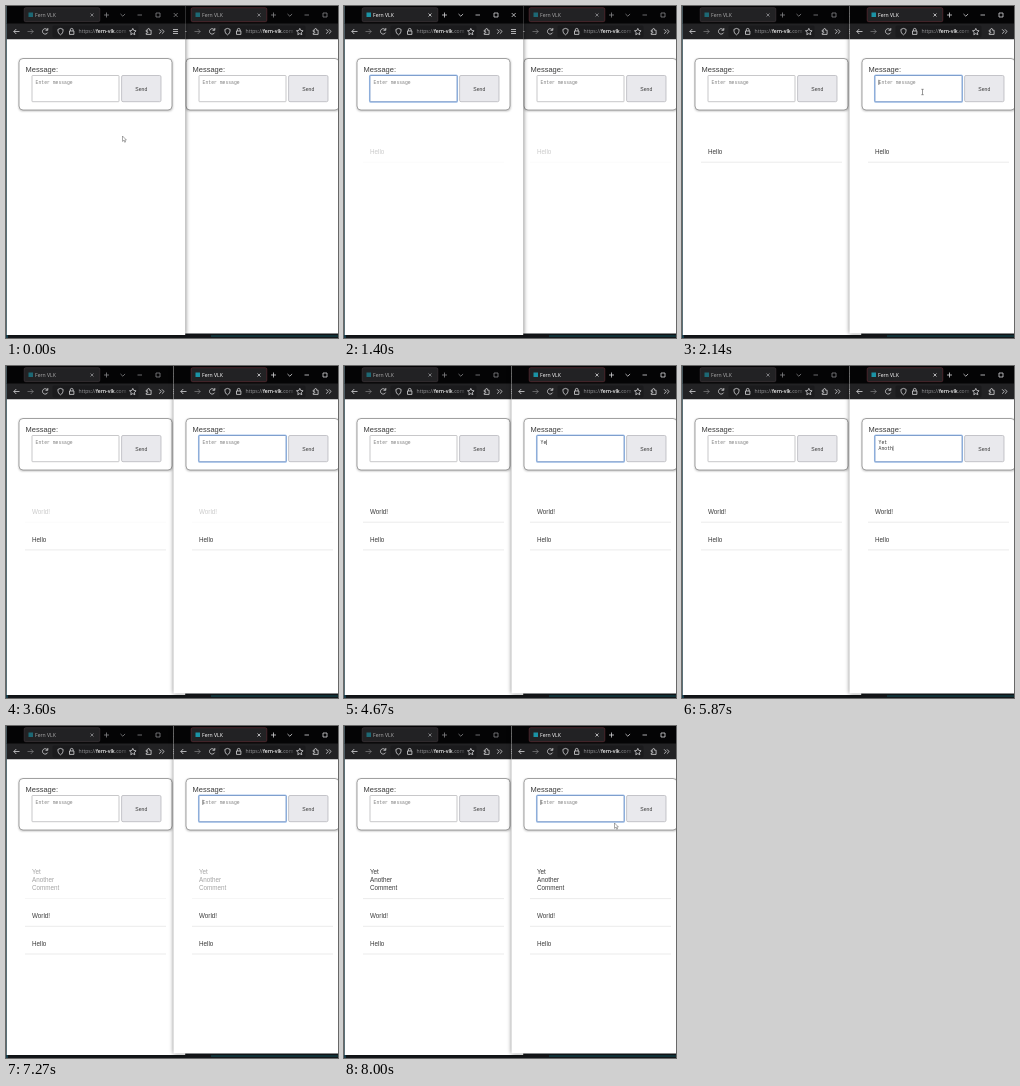
These frames come from a looping animation (332 by 332 pixels, 8070 ms). An HTML page:

```html
<!DOCTYPE html>
<html lang="en">
<head>
<meta charset="utf-8">
<title>Live messages</title>
<style>
html, body { margin: 0; height: 100%; overflow: hidden; background: #15181b; }
svg { display: block; width: 332px; height: 332px; }
text { white-space: pre; }
.ui { font-family: "Open Sans", sans-serif; font-size: 5.1px; }
.page { font-family: "Liberation Sans", Arial, sans-serif; fill: #3c3c3c; }
.mono { font-family: "Liberation Mono", monospace; font-size: 4.75px; }
.icon { fill: none; stroke: #d6d6d8; stroke-width: .8; stroke-linejoin: round; }
</style>
</head>
<body>
<svg viewBox="0 0 332 332">
  <defs>
    <linearGradient id="fade">
      <stop offset="0" stop-color="#1b1b1d" stop-opacity="0"/>
      <stop offset=".65" stop-color="#1b1b1d"/>
    </linearGradient>
  </defs>
  <rect width="332" height="332" fill="#15181b"/>
  <rect width="2" height="332" fill="#1d4452"/>
  <path d="M205 330H332" stroke="#12363c" stroke-width="2"/>
  <g id="scene"></g>
</svg>
<script>
const LOOP = 8070, SHIFT = 167, CHAR = 2.85, LINE = 6;
const FOCUS = 200, SWITCH = 1940;

// Text typed one character per listed time, then cleared; posted at `post`
const messages = [
  { side: 0, text: 'Hello', keys: [470, 600, 740, 800, 1000], clear: 1140, post: 1270 },
  { side: 1, text: 'World!', keys: [2600, 2670, 2740, 2800, 2940, 3200], clear: 3400, post: 3470 },
  { side: 1, text: 'Yet\nAnother\nComment',
    keys: [4470, 4600, 4800, 5200, 5470, 5600, 5740, 5800, 5870, 5940, 6000, 6270,
           6470, 6540, 6600, 6670, 6740, 6800, 6870], clear: 7060, post: 7040 },
];
const carets = [[270, 1140], [1940, 2400], [2600, 3400], [3940, 4270], [4470, 7530], [7800, LOOP]];
// Pointer paths: [time, x, y] points; hidden between paths
const paths = [
  [[0, 116.5, 130], [69, 116.5, 130], [270, 95, 86], [470, 95, 86]],
  [[1600, 95, 86], [2000, 240.5, 86], [2600, 240.5, 86]],
  [[7740, 240.5, 86], [8000, 270.5, 97], [LOOP, 270.5, 97]],
];

const within = ([a, b], t) => t >= a && t < b;
const icon = (d, extra = '') => `<path class="icon" d="${d}" ${extra}/>`;
const label = (x, y, s, attrs) => `<text x="${x}" y="${y}" ${attrs}>${s}</text>`;

function chrome(side, active) {
  const dim = active ? 1 : .62;
  return `<rect width="179" height="18" fill="#040405"/>
    <rect y="17.5" width="179" height="16" fill="#222224"/>
    <rect x="46" y="19.5" width="86" height="12" rx="1.5" fill="#1b1b1d"/>
    <rect x="17.7" y="1.7" width="75.6" height="14" rx="1.5" fill="#222224"
      stroke="${side ? '#6a3038' : '#453c40'}" stroke-width=".6"/>
    <g opacity="${dim}">
      <rect x="22" y="6.5" width="4.5" height="4.5" fill="#1b93a5"/>
      ${label(28.5, 10.8, 'Fern VLK', 'class="ui" fill="#fff"')}
      ${icon('M84 7.5l3 3m0-3l-3 3M97.5 9h5M100 6.5v5M114 8l2.3 2.2L118.6 8')}
      ${icon('M131 9h4.5M149.5 7h4v4h-4zM167.2 7l4 4m0-4l-4 4')}
    </g>
    ${icon('M13 25.5H7.3M9.8 23L7.3 25.5L9.8 28')}
    ${icon('M21 25.5h5.7M24.2 23l2.5 2.5L24.2 28', 'opacity=".45"')}
    ${icon('M41 24a2.7 2.7 0 1 0 .1 2.6M41.3 22v2.3H39')}
    ${icon('M54 22.4l2.6 1c0 3-.8 4.4-2.6 5.4c-1.8-1-2.6-2.4-2.6-5.4z')}
    ${icon('M63 25h4.4v3.4H63zM63.8 25v-1.2a1.4 1.4 0 0 1 2.8 0V25')}
    <text x="72" y="27.3" class="ui" fill="#9a9a9e">https://<tspan fill="#f4f4f4" font-weight="600">fern-vlk</tspan>.com</text>
    <rect x="112" y="21" width="19" height="9" fill="url(#fade)"/>
    ${icon('M126.3 22.4l1 2.1l2.3.3l-1.7 1.6l.4 2.3l-2-1.1l-2 1.1l.4-2.3l-1.7-1.6l2.3-.3z')}
    ${icon('M139.7 24.2h1.5v-.8a.9.9 0 0 1 1.8 0v.8h1.6v4.2h-4.9v-1.3h.8a.8.8 0 0 0 0-1.6h-.8z')}
    ${icon('M152.6 23.3l2.2 2.2l-2.2 2.2M155.4 23.3l2.2 2.2l-2.2 2.2')}
    ${icon('M166.5 23.5h5M166.5 25.5h5M166.5 27.5h5')}`;
}

function typed(side, t) {
  const m = messages.find(m => m.side === side && t >= m.keys[0] && t < m.clear);
  return m ? m.text.slice(0, m.keys.filter(k => k <= t).length) : '';
}

function form(side, focused, t) {
  const value = typed(side, t), lines = value.split('\n'), last = lines.length - 1;
  const content = value
    ? lines.map((s, i) => label(29.6, 78 + i * LINE, s, 'class="mono" fill="#333"')).join('')
    : label(29.6, 78, 'Enter message', 'class="mono" fill="#808080"');
  const caretX = 29.8 + lines[last].length * CHAR, caretY = 73.8 + last * LINE;
  const caret = focused && carets.some(c => within(c, t))
    ? `<path d="M${caretX} ${caretY}v5.2" stroke="#222" stroke-width=".5"/>` : '';
  const glow = focused
    ? '<rect x="25.8" y="69.3" width="87.4" height="26.6" rx="1" fill="none" stroke="#a9c6ec" stroke-width="1.7"/>' : '';
  return `<rect x="13" y="53" width="153.5" height="52" rx="4" fill="#777" opacity=".6" style="filter:blur(1px)"/>
    <rect x="13" y="52.5" width="153" height="51.5" rx="4" fill="#fff" stroke="#999" stroke-width=".9"/>
    ${label(19.5, 66.2, 'Message:', 'class="page" font-size="7.5"')}
    ${glow}
    <rect x="26" y="69.5" width="87" height="26.2" rx=".6" fill="#fff"
      stroke="${focused ? '#5b83bd' : '#b0b0b4'}" stroke-width=".7"/>
    ${content}${caret}
    <rect x="115.6" y="69.5" width="39.4" height="26.2" rx="1.4" fill="#e9e9ed" stroke="#b0b0b6" stroke-width=".7"/>
    ${label(135.3, 84.8, 'Send', 'class="page" font-size="5.1" text-anchor="middle"')}`;
}

function feed(t) {
  let top = 128.5, out = '';
  for (const m of messages.filter(m => t > m.post).reverse()) {
    const lines = m.text.split('\n'), bottom = top + 19.5 + 8.2 * lines.length;
    out += `<g opacity="${Math.min(1, (t - m.post) / 500)}">`
      + lines.map((s, i) => label(26, top + 19.4 + i * 8.2, s, 'class="page" font-size="6.3"')).join('')
      + `<path d="M19 ${bottom}h141" stroke="#e2e2e2" stroke-width=".7"/></g>`;
    top = bottom;
  }
  return out;
}

function browser(side, t) {
  const active = side ? t >= SWITCH : t >= FOCUS && t < SWITCH;
  const focused = active && (side || t >= 270);
  const height = side ? 327.5 : 329;
  return `<g transform="translate(${side ? SHIFT + .5 : .7})">
      <rect width="179" height="${height}" opacity=".5" style="filter:blur(2px)"/>
      <rect width="178.5" height="${height}" fill="#fff"/></g>
    <g transform="translate(${side * SHIFT + .5})"><svg width="178.7" height="33.5">
      ${chrome(side, active)}</svg></g>
    <g transform="translate(${side * SHIFT})">${form(side, focused, t)}${feed(t)}</g>`;
}

function pointer(t) {
  const path = paths.find(p => within([p[0][0], p.at(-1)[0]], t));
  if (!path) return '';
  const i = path.findIndex(p => p[0] > t), [t0, x0, y0] = path[i - 1], [t1, x1, y1] = path[i];
  const u = (t - t0) / (t1 - t0), k = u * u * (3 - 2 * u);
  const x = x0 + (x1 - x0) * k, y = y0 + (y1 - y0) * k;
  const overText = y > 69 && y < 96 && (within([26, 113], x) || within([193, 280], x));
  return `<g transform="translate(${x} ${y})">` + (overText
    ? '<path d="M-1.2-2.7h2.4M0-2.7v5.4M-1.2 2.7h2.4" fill="none" stroke="#555" stroke-width=".6"/>'
    : '<path d="M0 0v5.4l1.3-1.1l.9 2l.9-.4l-.9-1.9h1.7z" fill="#fff" stroke="#555" stroke-width=".5"/>') + '</g>';
}

const scene = document.getElementById('scene');
const start = performance.now();
function draw() {
  const t = (performance.now() - start) % LOOP;
  const order = t < SWITCH ? [1, 0] : [0, 1];
  scene.innerHTML = order.map(side => browser(side, t)).join('') + pointer(t);
  requestAnimationFrame(draw);
}
draw();
</script>
</body>
</html>
```
